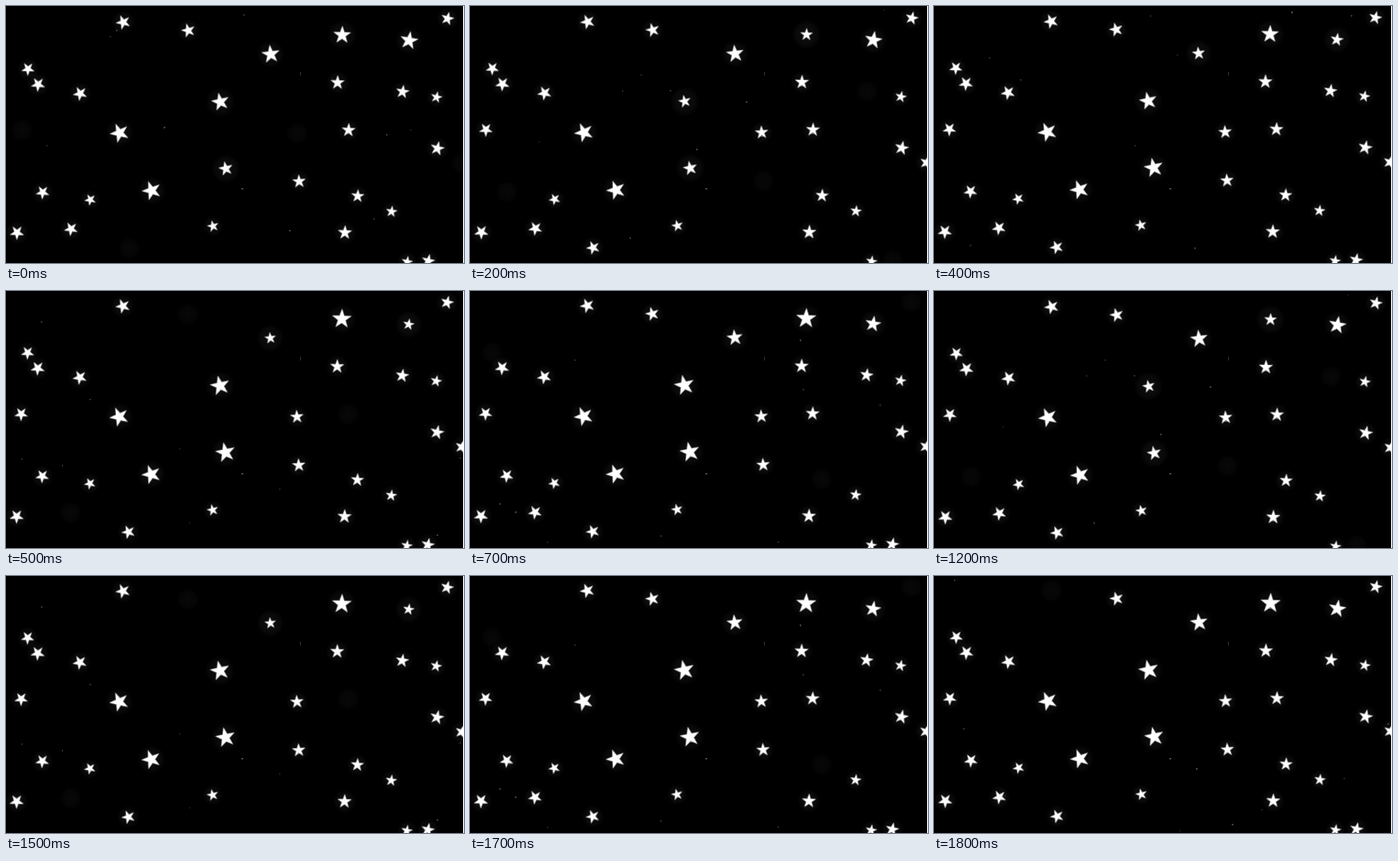
An HTML page with a canvas that plays this animation: 500 by 281 pixels, repeating every 1900 ms.

```html
<!DOCTYPE html>
<html lang="en">
<head>
<meta charset="utf-8">
<title>Twinkling stars</title>
<style>
  html, body { margin: 0; width: 100%; height: 100%; overflow: hidden; background: #000; }
  canvas { display: block; width: 500px; height: 281px; }
</style>
</head>
<body>
<canvas id="sky" width="500" height="281"></canvas>
<script>
const ctx = document.getElementById('sky').getContext('2d');
const W = 499, H = 281;
const LOOP = 1900, STEP = 100, CYCLE = 10;

// Stars share a size and the step of the cycle at which they dim
const stars = [];
function add(r, dim, ...points) {
  for (const [x, y] of points) stars.push({ x, y, r, dim });
}

add(6, null, [470, 99], [226, 240], [421, 224], [92, 211], [438, 279]);
add(7.6, null, [35, 85], [81, 95], [362, 83], [471, 155], [370, 247], [12, 247]);
add(10.5, null, [124, 138], [159, 201]);
add(7.2, 0, [498, 171], [318, 138], [134, 264], [17, 135]);
add(7.2, 2, [433, 93], [320, 191], [40, 203], [461, 278]);
add(7.4, 5, [199, 26], [374, 135], [71, 243]);
add(7, 7, [482, 13], [384, 207], [24, 68]);
add(7.8, 8, [128, 17]);
add(11, 1, [240, 177]);
add(11.2, 2, [367, 31], [234, 104]);
add(10, 5, [289, 52], [440, 37]);

function random(seed) {
  let s = seed * 7919 + 17;
  return () => {
    s = (s * 16807) % 2147483647;
    return s / 2147483647;
  };
}

// Large stars shrink softly around their dim step, small ones drop out for it
function sizeAt({ r, dim }, phase) {
  if (dim === null) return r;
  const gap = Math.abs(phase - dim);
  const d = Math.min(gap, CYCLE - gap);
  if (r < 9) return d ? r : 0;
  return r * (1 - 0.4 * Math.exp(-d * d / 3.5));
}

function glow(x, y, r, alpha) {
  const g = ctx.createRadialGradient(x, y, 0, x, y, r);
  g.addColorStop(0, `rgba(255,255,255,${alpha})`);
  g.addColorStop(0.7, `rgba(255,255,255,${alpha * 0.6})`);
  g.addColorStop(1, 'rgba(255,255,255,0)');
  ctx.fillStyle = g;
  ctx.fillRect(x - r, y - r, 2 * r, 2 * r);
}

function drawStar(x, y, r, tilt) {
  ctx.beginPath();
  for (let k = 0; k < 10; k++) {
    const a = tilt + k * Math.PI / 5 - Math.PI / 2;
    const d = k % 2 ? r * 0.4 : r;
    ctx.lineTo(x + d * Math.cos(a), y + d * Math.sin(a));
  }
  ctx.closePath();
  ctx.lineJoin = 'round';
  ctx.lineWidth = 1.6;
  ctx.strokeStyle = 'rgba(255,255,255,.4)';
  ctx.stroke();
  ctx.fillStyle = '#fff';
  ctx.fill();
}

function drawDust(phase) {
  const rnd = random(phase + 1);
  for (let k = 0; k < 9; k++) {
    const v = 35 + rnd() * 50 | 0;
    ctx.fillStyle = `rgb(${v},${v},${v})`;
    ctx.fillRect(rnd() * W | 0, rnd() * H | 0, 1 + rnd(), 1 + rnd());
  }
  // Lasting speck and scratch
  ctx.fillStyle = '#555';
  ctx.fillRect(257, 199, 2, 1.5);
  ctx.fillStyle = '#303030';
  ctx.fillRect(321, 72, 1, 4);
}

function draw(phase) {
  ctx.fillStyle = '#000';
  ctx.fillRect(0, 0, W, H);
  drawDust(phase);

  // The film weaves sideways and creeps upward
  const dx = 0.4 * Math.sin(phase * 0.9);
  const dy = 0.8 - 0.25 * phase;
  for (const star of stars) {
    const x = star.x + dx, y = star.y + dy;
    const r = sizeAt(star, phase);
    glow(x, y, star.r + 5, r ? 0.06 : 0.03);
    // Tilts fan out from a point right of the middle
    if (r) drawStar(x, y, r * 0.95, (star.x - 350) / 550);
  }

  ctx.fillStyle = '#fff';
  ctx.fillRect(W, 0, 1, H);
}

let shown = -1;
function tick() {
  const phase = Math.floor(performance.now() % LOOP / STEP) % CYCLE;
  if (phase !== shown) draw(shown = phase);
  requestAnimationFrame(tick);
}
tick();
</script>
</body>
</html>
```
